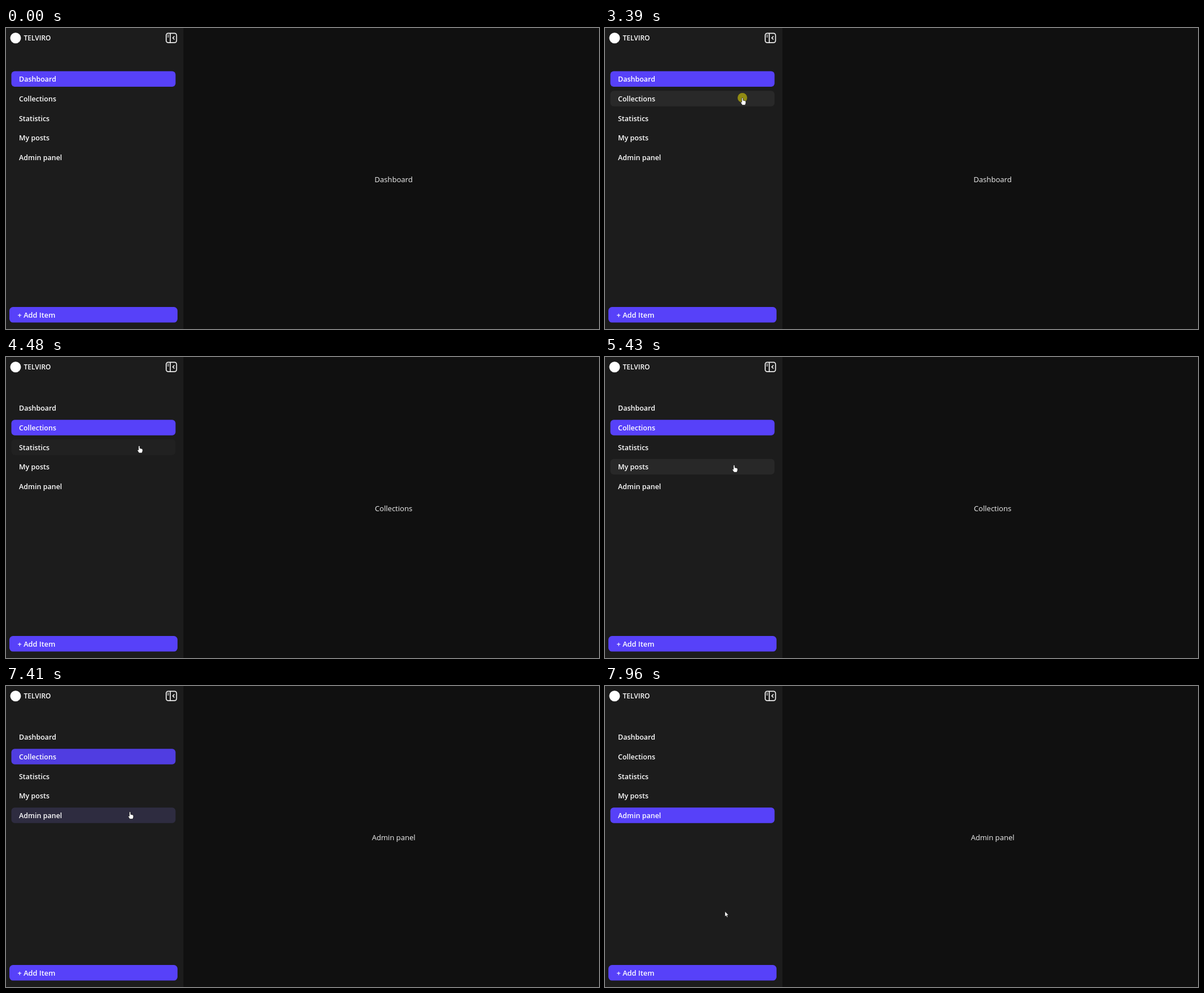
Recreate the animation shown at these times as an HTML page. Size 1051 by 533 pixels, loop 8000 ms.

```html
<!DOCTYPE html>
<html lang="en">
<head>
<meta charset="utf-8">
<title>Sidebar navigation</title>
<style>
  html, body { margin: 0; width: 100%; height: 100%; overflow: hidden; background: #101010; }
  svg { display: block; }
  text { font: 600 12.5px "Open Sans", "Noto Sans", sans-serif; fill: #fff; }
  #title { font-size: 13.1px; font-weight: 400; fill: #f2f2f2; text-anchor: middle; }
  .accent { fill: #5741f9; }
  .hover { fill: #292929; }
  .line { fill: none; stroke: #eee; stroke-linecap: round; stroke-linejoin: round; }
</style>
</head>
<body>
<svg width="1051" height="533" viewBox="0 0 1051 533">
  <rect width="1051" height="533" fill="#101010"/>
  <rect width="314.5" height="533" fill="#1c1c1c"/>
  <circle cx="17" cy="17.7" r="9.5" fill="#fff"/>
  <text x="31.5" y="22.4" style="font-size:12px">TELVIRO</text>
  <g class="line" stroke-width="1.7">
    <rect x="283.9" y="9.3" width="18.4" height="16.6" rx="3.6"/>
    <path d="M291.2 9.5V25.7M298 15.2L295.6 17.6L298 20"/>
    <path d="M286.4 12.8H288.4M286.4 15.6H288.4" stroke-width="1.2"/>
  </g>
  <g id="menu"></g>
  <rect class="accent" x="6" y="494" width="298" height="27.6" rx="6.5"/>
  <text x="20.5" y="513.2" style="font-size:12.8px">+ Add Item</text>
  <text id="title" x="687" y="273.4"></text>
  <circle id="click" r="8.5" fill="#918b13"/>
  <g id="cursor" fill="#fff" stroke="#111" stroke-width=".7" stroke-linejoin="round">
    <path id="arrow" d="M0 0V9.6L2.2 7.6L3.6 10.8L5.2 10.1L3.8 7L6.6 6.8Z"/>
    <path id="hand" d="M-1.2 .8Q0 -.5 1.2 .8V4.6L5 5.5Q6.2 6 6.2 7.2V9.5L4.9 12.9H-.2L-3.1 8.6Q-3.2 6.9 -1.2 7.9Z"/>
  </g>
</svg>
<script>
const LOOP = 8000, STEP = 70;
const ROW_TOP = 76.5, ROW_GAP = 34.67, ROW_HEIGHT = 27.6, ROW_LEFT = 9.5, ROW_WIDTH = 291;
const FIRST_CLICK = 3390, SECOND_CLICK = 7210, CLICK_LENGTH = 200;
const FIRST_SWITCH = FIRST_CLICK + CLICK_LENGTH, SECOND_SWITCH = SECOND_CLICK + CLICK_LENGTH;
const labels = ["Dashboard", "Collections", "Statistics", "My posts", "Admin panel"];

const bursts = [
  [320, 450], [780, 1060], [1330, 2030], [2430, 2990], [3590, 3930],
  [4130, 4870], [4950, 5710], [6110, 6810], [7410, 7960]
];

// Pointer hotspot: time, x, y
const path = [
  [320, 628, 430], [390, 545, 385], [450, 490, 350],
  [710, 490, 350], [780, 468, 318], [850, 420, 225], [920, 367, 125], [990, 380, 85], [1060, 402, 71],
  [1260, 402, 71], [1540, 335, 74], [1750, 290, 81], [2030, 266, 94],
  [2360, 266, 94], [2640, 254, 112], [2990, 243.5, 123.5],
  [4060, 243.5, 123.5], [4480, 236, 157], [4870, 234, 163],
  [4880, 234, 163], [5230, 230, 188], [5710, 226, 199],
  [6040, 226, 199], [6320, 225, 204], [6460, 222, 218], [6810, 219.7, 222.7],
  [7410, 219.7, 222.7], [7480, 219, 230], [7690, 216, 315], [7960, 212.5, 399]
];

// Hovered periods per row: enter, leave
const hovers = { 1: [2600, 4200], 2: [4340, 5027], 3: [5125, 6280], 4: [6430, LOOP] };

const $ = id => document.getElementById(id);
const rowTop = i => ROW_TOP + i * ROW_GAP;
const toggle = (el, on) => el.setAttribute("visibility", on ? "visible" : "hidden");

$("menu").innerHTML = labels.map((label, i) => {
  const box = `x="${ROW_LEFT}" y="${rowTop(i)}" width="${ROW_WIDTH}" height="${ROW_HEIGHT}" rx="6"`;
  return `<rect class="hover" ${box}/><rect class="accent" ${box}/>
    <text x="23" y="${rowTop(i) + 18.7}">${label}</text>`;
}).join("");
const hoverBoxes = document.querySelectorAll("#menu .hover");
const activeBoxes = document.querySelectorAll("#menu .accent");

function fade(t, start, length) {
  const p = Math.min(1, Math.max(0, (t - start) / length));
  return p * p * (3 - 2 * p);
}

const switched = (t, start) => t < start ? 0 : fade(t, start - 85, 425);

function snap(t) {
  const burst = bursts.findLast(([start]) => start <= t);
  if (!burst) return t;
  const [start, end] = burst;
  return t >= end ? end : start + Math.floor((t - start) / STEP) * STEP;
}

function pointerAt(t) {
  const next = path.findIndex(([time]) => time > t);
  if (next === 0) return path[0].slice(1);
  if (next < 0) return path.at(-1).slice(1);
  const [t0, x0, y0] = path[next - 1], [t1, x1, y1] = path[next];
  const p = (t - t0) / (t1 - t0);
  return [x0 + (x1 - x0) * p, y0 + (y1 - y0) * p];
}

function overRow(x, y) {
  const offset = y - ROW_TOP;
  return x >= ROW_LEFT && x <= ROW_LEFT + ROW_WIDTH &&
    offset >= 0 && offset < labels.length * ROW_GAP && offset % ROW_GAP < ROW_HEIGHT;
}

function draw(now) {
  const time = now % LOOP, t = snap(time);
  const first = switched(t, FIRST_SWITCH), second = switched(t, SECOND_SWITCH);
  const active = [1 - first, first - second, 0, 0, second];
  labels.forEach((_, i) => {
    const [enter, leave] = hovers[i] || [LOOP, LOOP];
    hoverBoxes[i].setAttribute("opacity", fade(t, enter, 300) - fade(t, leave, 300));
    activeBoxes[i].setAttribute("opacity", active[i]);
  });
  $("title").textContent = labels[time < FIRST_SWITCH ? 0 : time < SECOND_SWITCH ? 1 : 4];

  const [x, y] = pointerAt(t), shown = time >= bursts[0][0], pointing = overRow(x, y);
  const place = `translate(${x} ${y})`;
  $("cursor").setAttribute("transform", place);
  $("click").setAttribute("transform", place);
  toggle($("arrow"), shown && !pointing);
  toggle($("hand"), shown && pointing);
  toggle($("click"), [FIRST_CLICK, SECOND_CLICK].some(c => time >= c && time < c + CLICK_LENGTH));
  requestAnimationFrame(() => draw(performance.now()));
}
draw(performance.now());
</script>
</body>
</html>
```
